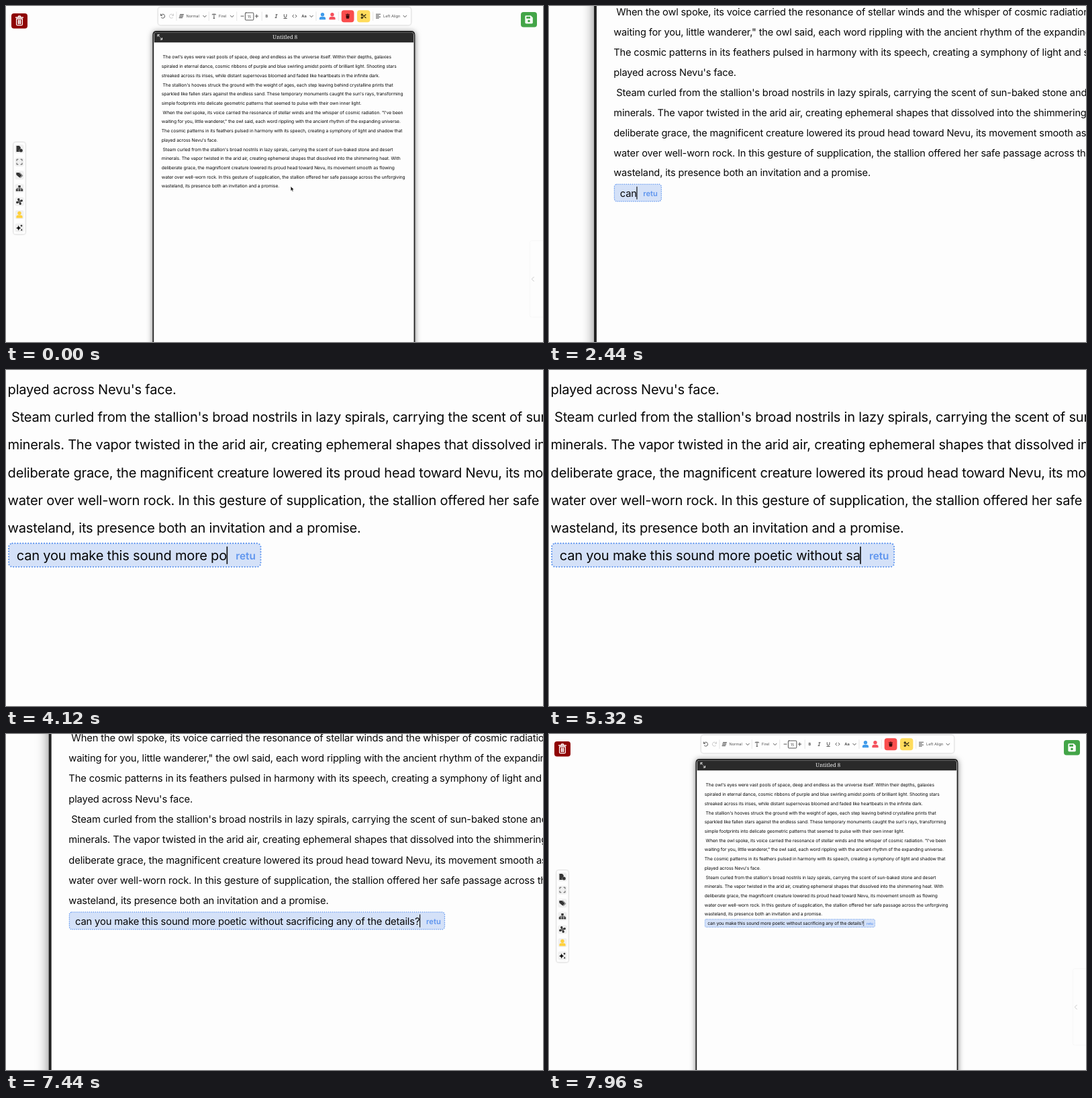
Write an HTML page that moves like this. It is 800 by 500 pixels and loops after 8 s.

```html
<!DOCTYPE html>
<html lang="en">
<head>
<meta charset="utf-8">
<title>Writing editor</title>
<style>
  html, body { margin: 0; width: 100%; height: 100%; overflow: hidden; background: #fdfdfd; }
  svg { display: block; width: 100vw; height: 100vh; }
  text { font-family: Inter, sans-serif; font-optical-sizing: none; text-rendering: geometricPrecision; white-space: pre; }
  .prose { font-size: 6.7px; letter-spacing: -.071px; fill: #080808; }
  .tag { font-size: 5.1px; font-weight: 600; fill: #5f95ee; }
  .title { font: 7.9px "Noto Serif", serif; fill: #f2f2f2; text-anchor: middle; }
  .ui { font-size: 5.7px; fill: #555; }
  .mid { text-anchor: middle; }
  .line { fill: none; stroke: #444; stroke-width: .9; stroke-linecap: round; stroke-linejoin: round; }
  .white { stroke: #fff; }
  .pale { stroke: #c4c4c4; }
  .sep { fill: none; stroke: #dcdcdc; stroke-width: .7; }
  .card { fill: #fefefe; filter: drop-shadow(0 0 1.2px rgba(0,0,0,.32)); }
  .page { fill: #fdfdfd; stroke: #222; stroke-width: 1.8; filter: drop-shadow(0 1px 4px rgba(0,0,0,.5)); }
  .bubble { fill: #d4e1f8; stroke: #5790ee; stroke-width: .7; stroke-dasharray: 0 1.32; stroke-linecap: round; }
</style>
</head>
<body>
<svg viewBox="0 0 800 500" preserveAspectRatio="none">
  <defs>
    <path id="chevron" class="line" d="M-2.3-1.2L0 1.2 2.3-1.2"/>
    <g id="person"><circle cy="-2.4" r="2.7"/><path d="M-4.6 5V3.2Q-4.6.7-2 .7H2Q4.6.7 4.6 3.2V5Z"/></g>
    <g id="bin"><path d="M-3-2.2H3L2.6 3.2Q2.5 4 1.7 4H-1.7Q-2.5 4-2.6 3.2ZM-3.5-3.6H-1.2L-.7-4.3H.7L1.2-3.6H3.5V-2.7H-3.5Z"/></g>
  </defs>
  <g id="scene">
    <!-- page -->
    <path class="page" d="M219.3 510V43Q219.3 38 224.3 38H603.5Q608.5 38 608.5 43V510Z"/>
    <path d="M220.8 54.2V42.5Q220.8 39.3 224 39.3H603.8Q607 39.3 607 42.5V54.2Z" fill="#2a2a2a"/>
    <text class="title" x="415.7" y="49.3">Untitled 8</text>
    <path class="line white" d="M226 45.2V42.8H228.4M226.2 43L228.6 45.4M232.6 47.6V50H230.2M232.4 49.8L230 47.4"/>
    <g id="prose"></g>

    <!-- toolbar -->
    <rect class="card" x="226.7" y="2" width="376.6" height="26.2" rx="4"/>
    <path class="sep" d="M254 8.5V22M302.3 8.5V22M343.7 8.5V22M381.2 8.5V22M462 8.5V22M495.3 8.5V22M546.7 8.5V22"/>
    <path class="line" stroke-width=".7" d="M230.6 12V14.2H232.8M230.8 14A3 3 0 1 1 231.4 17.2"/>
    <path class="line pale" d="M249.4 12V14.2H247.2M249.2 14A3 3 0 1 0 248.6 17.2"/>
    <path class="line" d="M259.5 12.5H264.5M258.8 14.2H264M258.4 15.9H263.5M258 17.6H262.6"/>
    <text class="ui" x="268.4" y="17">Normal</text>
    <use href="#chevron" x="296" y="15.4"/>
    <path class="line" d="M307.4 13V12.2H312.3V13M309.9 12.2V18.3M309 18.3H310.8"/>
    <text class="ui" x="316.8" y="17">Firel</text>
    <use href="#chevron" x="336.7" y="15.4"/>
    <path class="line" d="M350 15.1H354M371.3 15.1H375.7M373.5 12.9V17.3"/>
    <rect class="line" x="356.4" y="10" width="12.4" height="11" rx="1"/>
    <text class="ui mid" x="362.6" y="17.7">15</text>
    <text class="ui mid" x="388.5" y="17.3" font-weight="700">B</text>
    <path class="line" stroke-width=".7" d="M402 12.8H404.1M401 17.4H403M403.1 12.8L402 17.4M414.3 12.6V15Q414.3 17 416.1 17 417.9 17 417.9 15V12.6M413.9 18.5H418.3M428.6 13.2L426.7 15.1 428.6 17M431.2 13.2L433.1 15.1 431.2 17"/>
    <text class="ui mid" x="444" y="17.3" font-weight="700" fill="#222">Aa</text>
    <use href="#chevron" x="455" y="15.4"/>
    <use href="#person" x="471.5" y="15.2" fill="#3f9bea"/>
    <use href="#person" x="486" y="15.2" fill="#f4515c"/>
    <rect x="499.7" y="6.2" width="18.8" height="18" rx="4" fill="#fa4d4d"/>
    <use href="#bin" transform="translate(509 15.3) scale(.86)" fill="#3a0909"/>
    <rect x="523" y="6.2" width="19.4" height="18" rx="4" fill="#ffdc5c"/>
    <g class="line" style="stroke:#292310;stroke-width:1.2">
      <circle cx="530.3" cy="13" r="1.1"/><circle cx="530.3" cy="17.4" r="1.1"/>
      <path d="M531.4 13.6L536 17.5M531.4 16.8L536 12.8"/>
    </g>
    <path class="line" d="M551.4 12.2H557.7M551.4 14.2H555.4M551.4 16.2H557.7M551.4 18.2H555.4"/>
    <text class="ui" x="562" y="17">Left Align</text>
    <use href="#chevron" x="594.3" y="15.4"/>

    <!-- corner buttons -->
    <rect x="8" y="11" width="24" height="22.5" rx="4" fill="#8f0303"/>
    <g class="line white" style="stroke-width:1.3">
      <path d="M14.5 17H25.5M18 16.7L18.7 15H21.3L22 16.7M15.6 19V27.2Q15.6 28.7 17.1 28.7H22.9Q24.4 28.7 24.4 27.2V19ZM18.4 21V26.6M20 21V26.6M21.6 21V26.6"/>
    </g>
    <rect x="767" y="9" width="24" height="22.4" rx="4" fill="#43a548"/>
    <path d="M773.8 14.2H781.8L784.8 17.2V24.8Q784.8 26.2 783.4 26.2H775Q773.4 26.2 773.4 24.8V15.4Q773.4 14.2 774.6 14.2Z" fill="#fff"/>
    <path d="M775.2 15.8H781V18.7H775.2Z" fill="#43a548"/><circle cx="779" cy="22.4" r="1.8" fill="#43a548"/>

    <!-- side tools -->
    <rect class="card" x="11.3" y="203" width="17.5" height="136.5" rx="3"/>
    <g id="slots" fill="#f0f0f0"></g>
    <g fill="#343434">
      <path d="M15.5 208H19.7L21.7 210V212.4A3 3 0 0 0 20 217H15.5Z"/>
      <circle cx="22.3" cy="215" r="2.5"/>
      <path d="M15.3 248H19.4L23.6 252.2 20.4 255.4 15.3 251.2Z"/><path d="M20.6 248.2L24.8 252.4 21.8 255.4" class="line"/>
      <path d="M18.3 267H21.7V270H18.3ZM14.8 272.6H17.8V275.4H14.8ZM18.5 272.6H21.5V275.4H18.5ZM22.2 272.6H25.2V275.4H22.2Z"/>
      <path id="blade" d="M20 291Q17.5 290 17 287.7 17.5 285.8 19.3 286 21.2 287 20 291Z"/>
      <use href="#blade" transform="rotate(90 20 291)"/><use href="#blade" transform="rotate(180 20 291)"/><use href="#blade" transform="rotate(270 20 291)"/>
    </g>
    <path class="line" d="M16 230.2V228.2H18M22 228.2H24V230.2M24 233.8V235.8H22M18 235.8H16V233.8M20 270V272.5M16.3 272.5V271.3H23.7V272.5"/>
    <use href="#person" x="20" y="310.6" fill="#ffd03b"/>
    <path d="M18.7 326.3Q19.2 329.8 22.4 330.4 19.2 331 18.7 334.4 18.2 331 15 330.4 18.2 329.8 18.7 326.3ZM23 325Q23.2 326.6 24.8 326.9 23.2 327.2 23 328.8 22.8 327.2 21.2 326.9 22.8 326.6 23 325ZM23.2 331.6Q23.4 333 24.6 333.2 23.4 333.4 23.2 334.8 23 333.4 21.8 333.2 23 333 23.2 331.6Z" fill="#111"/>

    <!-- drawer -->
    <path d="M801 349.3H783.4Q780.4 349.3 780.4 352.3V460Q780.4 463 783.4 463H801" fill="none" stroke="#f5f5f5" stroke-width=".8"/>
    <path class="line pale" d="M786.3 403.3L783.3 406.4 786.3 409.5"/>

    <!-- prompt -->
    <g id="prompt">
      <rect id="bubble" class="bubble" x="232.3" y="275.7" height="11.7" rx="1.8"/>
      <text id="typed" class="prose" x="236.2" y="284.2"></text>
      <path id="caret" d="M0 277.3V286" stroke="#111" stroke-width=".55"/>
      <text id="tag" class="tag" y="283.8">retu</text>
    </g>
    <path id="pointer" d="M424.2 268.4V275.2L425.7 273.8 426.8 276.2 428 275.6 426.9 273.3H429Z" fill="#080808" stroke="#fff" stroke-width=".5"/>
  </g>
</svg>
<script>
const LOOP = 8000;
const FOCUS = { x: 346.4, y: 284.6, scale: 3 };
const ZOOM_IN = 2014, ZOOM_OUT = 7070, ZOOM_TIME = 800;
const PROMPT_START = 2200;
const PROMPT = "can you make this sound more poetic without sacrificing any of the details?";
// [time, characters typed]
const KEYS = [[2310, 0], [2435, 3], [3035, 17], [5030, 43], [5310, 46], [5870, 53], [6515, 70], [6760, 76]];

const PROSE = [
  " The owl's eyes were vast pools of space, deep and endless as the universe itself. Within their depths, galaxies",
  "spiraled in eternal dance, cosmic ribbons of purple and blue swirling amidst points of brilliant light. Shooting stars",
  "streaked across its irises, while distant supernovas bloomed and faded like heartbeats in the infinite dark.",
  " The stallion's hooves struck the ground with the weight of ages, each step leaving behind crystalline prints that",
  "sparkled like fallen stars against the endless sand. These temporary monuments caught the sun's rays, transforming",
  "simple footprints into delicate geometric patterns that seemed to pulse with their own inner light.",
  " When the owl spoke, its voice carried the resonance of stellar winds and the whisper of cosmic radiation. \"I've been",
  "waiting for you, little wanderer,\" the owl said, each word rippling with the ancient rhythm of the expanding universe.",
  "The cosmic patterns in its feathers pulsed in harmony with its speech, creating a symphony of light and shadow that",
  "played across Nevu's face.",
  " Steam curled from the stallion's broad nostrils in lazy spirals, carrying the scent of sun-baked stone and desert",
  "minerals. The vapor twisted in the arid air, creating ephemeral shapes that dissolved into the shimmering heat. With",
  "deliberate grace, the magnificent creature lowered its proud head toward Nevu, its movement smooth as flowing",
  "water over well-worn rock. In this gesture of supplication, the stallion offered her safe passage across the unforgiving",
  "wasteland, its presence both an invitation and a promise."
];

const $ = id => document.getElementById(id);
const add = (parent, name, attrs, content = "") => {
  const el = document.createElementNS("http://www.w3.org/2000/svg", name);
  for (const key in attrs) el.setAttribute(key, attrs[key]);
  el.textContent = content;
  parent.append(el);
};
PROSE.forEach((line, i) => add($("prose"), "text", { class: "prose", x: 231.8, y: 78.4 + 13.71 * i }, line));
for (let i = 0; i < 7; i++)
  add($("slots"), "rect", { x: 13.6, y: 206.2 + 19.55 * i, width: 13, height: 13, rx: 2.5 });

const clamp = v => Math.min(1, Math.max(0, v));
const ease = v => v < .5 ? 4 * v ** 3 : 1 - 4 * (1 - v) ** 3;
const ramp = (t, start) => ease(clamp((t - start) / ZOOM_TIME));

function typedCount(t) {
  let count = 0;
  for (let i = 1; i < KEYS.length; i++) {
    const [t0, n0] = KEYS[i - 1], [t1, n1] = KEYS[i];
    if (t >= t0) count = n0 + Math.floor((n1 - n0) * clamp((t - t0) / (t1 - t0)));
  }
  return count;
}

function render(t) {
  const s = 1 + (FOCUS.scale - 1) * (ramp(t, ZOOM_IN) - ramp(t, ZOOM_OUT));
  $("scene").setAttribute("transform", `translate(${FOCUS.x * (1 - s)} ${FOCUS.y * (1 - s)}) scale(${s})`);

  const writing = t >= PROMPT_START;
  $("pointer").setAttribute("visibility", writing ? "hidden" : "visible");
  $("prompt").setAttribute("visibility", writing ? "visible" : "hidden");

  const text = PROMPT.slice(0, typedCount(t));
  if ($("typed").textContent !== text) $("typed").textContent = text;
  const end = 236.2 + (text ? $("typed").getComputedTextLength() : 0);
  $("caret").setAttribute("transform", `translate(${end + .1} 0)`);
  $("tag").setAttribute("x", end + 4.4);
  $("bubble").setAttribute("width", end + 16.8 - 232.3);
}

let start;
function tick(now) {
  start ??= now;
  render((now - start) % LOOP);
  requestAnimationFrame(tick);
}
render(0);
requestAnimationFrame(tick);
</script>
</body>
</html>
```
